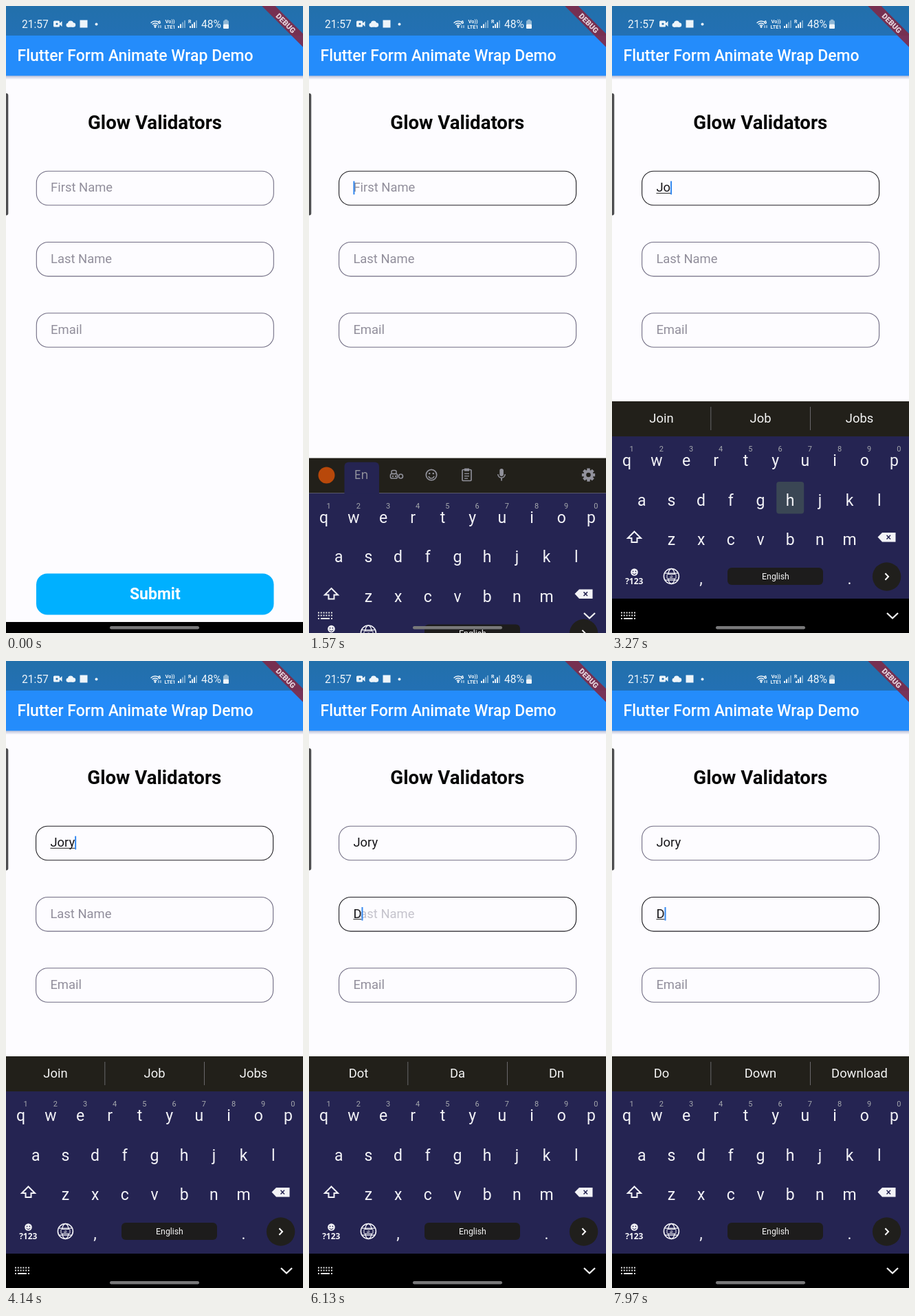
These frames come from a looping animation (432x912 px, 7990 ms). An HTML page with a canvas:

```html
<!DOCTYPE html>
<html lang="en">
<head>
<meta charset="utf-8">
<title>Form demo</title>
<style>
  html, body { margin: 0; width: 100%; height: 100%; overflow: hidden; background: #fdfcff; }
  canvas { display: block; width: 432px; height: 912px; }
</style>
</head>
<body>
<canvas id="stage"></canvas>
<script>
const W = 432, H = 912, LOOP = 7990;
const canvas = document.getElementById('stage');
const c = canvas.getContext('2d');
const dpr = window.devicePixelRatio || 1;
canvas.width = W * dpr;
canvas.height = H * dpr;

const NAVY = '#252452', OLIVE = '#22201a', PAPER = '#fdfcff', BLUE = '#248cfb', ICON = '#92929c';
const KEY_TOP = 575;
const FOCUS_FIRST = 1300, FOCUS_LAST = 4400;

const clamp = v => Math.max(0, Math.min(1, v));
const last = (list, t) => list.filter(e => e[0] <= t).pop();

// [time, text] pairs
const firstName = [[0, ''], [2600, 'J'], [3080, 'Jo'], [3340, 'Jor'], [3700, 'Jory']];
const lastName = [[0, ''], [6050, 'D']];
const suggestions = [
  [0, null], [2640, ['Join', 'Job', 'Jobs']], [FOCUS_LAST + 40, null],
  [6090, ['Dot', 'Da', 'Dn']], [7500, ['Do', 'Down', 'Download']]
];
const cursorResets = [FOCUS_FIRST, 2600, 3080, 3340, 3700, FOCUS_LAST, 6050, 7500];
// [start, end, key]
const presses = [
  [2030, 2150, 'shift'], [2480, 2600, 'j'], [2970, 3080, 'o'], [3220, 3340, 'h'],
  [3590, 3700, 'y'], [5400, 5520, 'shift'], [5940, 6050, 'd']
];
const rows = [
  { keys: 'qwertyuiop', x: 21.6, y: 669 },
  { keys: 'asdfghjkl', x: 43.2, y: 726.5 },
  { keys: 'zxcvbnm', x: 86.4, y: 784 }
];

function text(s, x, y, size, color, { weight = 400, align = 'left', family = 'Roboto' } = {}) {
  c.font = `${weight} ${size}px ${family}, sans-serif`;
  c.textAlign = align;
  c.fillStyle = color;
  c.fillText(s, x, y);
}
function rect(x, y, w, h, color) {
  c.fillStyle = color;
  c.fillRect(x, y, w, h);
}
function round(x, y, w, h, r, fill, stroke, lw = 1) {
  c.beginPath();
  c.roundRect(x, y, w, h, r);
  if (fill) { c.fillStyle = fill; c.fill(); }
  if (stroke) { c.strokeStyle = stroke; c.lineWidth = lw; c.stroke(); }
}
function disc(x, y, r, color) {
  c.beginPath();
  c.arc(x, y, r, 0, 7);
  c.fillStyle = color;
  c.fill();
}
function ring(x, y, r, color, lw, a = 0, b = Math.PI * 2) {
  c.beginPath();
  c.arc(x, y, r, a, b);
  c.strokeStyle = color;
  c.lineWidth = lw;
  c.stroke();
}
function poly(points, { fill, stroke, lw = 1, close = false }) {
  c.beginPath();
  points.forEach(([x, y], i) => i ? c.lineTo(x, y) : c.moveTo(x, y));
  if (close || fill) c.closePath();
  if (fill) { c.fillStyle = fill; c.fill(); }
  if (stroke) { c.strokeStyle = stroke; c.lineWidth = lw; c.stroke(); }
}

function bars(x, lit) {
  for (let i = 0; i < 4; i++) {
    const h = 3 + i * 2.7;
    rect(x + i * 3, 32 - h, 2, h, i < lit ? '#e8f1f8' : '#78a9d0');
  }
}

function statusBar() {
  const g = c.createLinearGradient(0, 0, 0, 43);
  g.addColorStop(0, '#2270ab');
  g.addColorStop(1, '#2370b4');
  rect(0, 0, W, 43, g);
  const ink = '#eef5fa';
  text('21:57', 23, 32, 15.6, ink);
  round(69, 21.5, 9, 9, 1.5, ink);
  poly([[77, 26], [81.5, 22], [81.5, 30]], { fill: ink });
  disc(74, 26, 1.6, '#2370b0');
  disc(90.5, 27.7, 3, ink);
  disc(94, 25.5, 4, ink);
  disc(98, 27.5, 3.2, ink);
  rect(90, 27, 8, 3.7, ink);
  round(107.5, 20.5, 11, 11, 0, ink);
  disc(131.5, 26.5, 2, ink);

  for (const r of [3, 6, 9]) ring(217, 31, r, ink, 1.4, -2.36, -0.78);
  disc(217, 30.5, 1.4, ink);
  text('6', 221, 26, 7.5, ink, { weight: 700 });
  poly([[222, 28], [222, 32]], { stroke: ink });
  poly([[225, 28], [225, 32]], { stroke: ink });
  text('Vo))', 231.5, 25, 7.5, ink, { weight: 700 });
  text('LTE1', 230.5, 33, 7.3, ink, { weight: 700 });
  bars(250, 2);
  text('R', 265, 25, 7, ink, { weight: 700 });
  bars(267, 3);
  text('48%', 284, 32, 15.6, ink);
  round(316, 21, 8, 12, 1.5, '#8eb7d6');
  rect(318, 19.7, 4, 1.5, '#8eb7d6');
  round(316, 26.5, 8, 6.5, 1.5, ink);
}

function appBar() {
  const g = c.createLinearGradient(0, 101, 0, 107);
  g.addColorStop(0, '#bcbfd2');
  g.addColorStop(0.6, '#dfe0ee');
  g.addColorStop(1, PAPER);
  rect(0, 101, W, 6, g);
  rect(0, 43, W, 58.5, BLUE);
  text('Flutter Form Animate Wrap Demo', 16.5, 80, 23, '#fff', { weight: 500 });
}

function ribbon() {
  c.save();
  c.translate(W, 0);
  c.rotate(Math.PI / 4);
  rect(-60, 28.5, 120, 13.8, 'rgba(128, 42, 72, 0.9)');
  text('DEBUG', 0, 39.3, 11, '#e6d3dc', { weight: 900, align: 'center' });
  c.restore();
}

function cursorAlpha(t) {
  const start = cursorResets.filter(e => e <= t).pop();
  if (start === undefined) return 0;
  return (t - start) % 1000 < 500 ? 1 : 0;
}

function field(y, hint, value, focused, t, hintAlpha) {
  const x = 43.8, base = y + 30;
  round(x, y, 345, 49.6, 17, null, focused ? '#201f24' : '#716d84', 1.1);
  if (hintAlpha > 0) {
    c.globalAlpha = hintAlpha;
    text(hint, 64.6, base, 18.4, '#918e9b');
    c.globalAlpha = 1;
  }
  text(value, 64.6, base, 18.4, '#17161a');
  const w = c.measureText(value).width;
  if (!focused) return;
  if (value) rect(64.6, base + 1.6, w, 1.1, '#333');
  if (cursorAlpha(t)) rect(64.6 + w, y + 14.5, 2, 19.5, '#3388f0');
}

function form(t) {
  const onFirst = t >= FOCUS_FIRST && t < FOCUS_LAST;
  const fade = at => 1 - clamp((t - at) / 167);
  c.save();
  c.translate(t < FOCUS_FIRST ? 0.5 : -0.2, 0);
  text('Glow Validators', 216, 179, 27.6, '#050505', { weight: 700, align: 'center' });
  field(240.2, 'First Name', last(firstName, t)[1], onFirst, t, fade(2600));
  field(343.5, 'Last Name', last(lastName, t)[1], t >= FOCUS_LAST, t, fade(6050));
  field(446.7, 'Email', '', false, t, 1);
  round(43.5, 825.5, 345.5, 60, 16, '#00b0ff');
  text('Submit', 216.3, 863, 23, '#fff', { weight: 700, align: 'center' });
  c.restore();
  round(-4, 127, 7.3, 177.5, 3, '#4e4e50');
}

function toolbar() {
  disc(25.5, 600, 12, '#b8480a');
  round(51.5, 581, 50.5, 46, [6, 6, 0, 0], NAVY);
  text('En', 76, 605.5, 17.5, ICON, { align: 'center', family: '"Noto Sans"' });

  round(118.5, 598, 10, 6.5, 2, null, ICON, 1.6);
  round(120, 593, 7, 5, 2, null, ICON, 1.5);
  rect(121, 600.5, 2, 2, ICON);
  rect(125, 600.5, 2, 2, ICON);
  ring(133.5, 601.5, 3, ICON, 1.6);

  ring(178, 599.5, 7.7, ICON, 1.7);
  disc(175.2, 597.5, 1.3, ICON);
  disc(180.8, 597.5, 1.3, ICON);
  ring(178, 600.5, 4, ICON, 1.6, 0.2, 2.95);

  round(223, 592, 13, 16, 1, null, ICON, 1.6);
  rect(226, 590, 7, 4, ICON);
  for (const y of [597, 600.5, 604]) rect(226, y, y > 603 ? 5 : 7, 1.3, ICON);

  round(277.3, 590.5, 5.6, 11, 2.8, ICON);
  ring(280, 598.5, 5.2, ICON, 1.5, 0, Math.PI);
  rect(279.2, 603.5, 1.7, 4.5, ICON);

  for (let i = 0; i < 8; i++) {
    c.save();
    c.translate(406.5, 599.5);
    c.rotate(i * Math.PI / 4);
    rect(-2.2, -9.6, 4.4, 4.6, ICON);
    c.restore();
  }
  ring(406.5, 599.5, 5.3, ICON, 4);
}

function suggestionStrip(words) {
  words.forEach((w, i) => text(w, 72 + 144 * i, 606, 18.4, '#f4f4f4', { align: 'center' }));
  rect(143.3, 583, 1, 34, '#69686a');
  rect(288, 583, 1, 34, '#69686a');
}

function keys(t) {
  const press = presses.find(p => t >= p[0] && t < p[1]);
  const held = press && press[2];
  const light = '#f3f3f7';
  if (held === 'shift') round(2, 750, 61, 46, 4, '#3a4654');
  rows.forEach(({ keys, x, y }, row) => {
    [...keys].forEach((k, i) => {
      const cx = x + 43.2 * i;
      if (k === held) round(cx - 20, y - 34.5, 40, 46.5, 4, '#3a4654');
      text(k, cx, y, 23, light, { align: 'center' });
      if (row === 0) text((i + 1) % 10, cx + 7, 648, 11, '#a5a8ad', { align: 'center' });
    });
  });

  poly([[32.5, 764.5], [42, 774], [36.5, 774], [36.5, 780], [28.5, 780], [28.5, 774], [23, 774]],
    { stroke: light, lw: 2, close: true });
  poly([[386.5, 772.5], [393, 766], [412.5, 766], [412.5, 779.5], [393, 779.5]], { fill: light });
  poly([[399.5, 769.8], [405, 775.5]], { stroke: NAVY, lw: 1.5 });
  poly([[405, 769.8], [399.5, 775.5]], { stroke: NAVY, lw: 1.5 });

  disc(32.5, 823.5, 5.3, light);
  disc(30.6, 822.3, 0.9, NAVY);
  disc(34.4, 822.3, 0.9, NAVY);
  ring(32.5, 824, 2.7, NAVY, 1, 0.3, 2.85);
  text('?123', 32.3, 841, 12, light, { weight: 600, align: 'center', family: '"Noto Sans"' });

  ring(86.4, 829.5, 11, light, 1.6);
  c.beginPath();
  c.ellipse(86.4, 829.5, 5, 11, 0, 0, 7);
  c.lineWidth = 1.3;
  c.stroke();
  for (const y of [824.5, 834.5]) rect(77, y, 19, 1.2, light);
  round(80, 826.5, 13, 6.5, 1, NAVY, light, 1);
  text('⌀', 86.4, 832.4, 7, light, { align: 'center', family: '"DejaVu Sans"' });

  text(',', 129.6, 841, 23, light, { align: 'center' });
  round(168, 817, 139, 25, 6, '#1d1c1c');
  text('English', 238, 834, 12.3, '#f8f8f8', { align: 'center' });
  text('.', 345.6, 841, 23, light, { align: 'center' });
  disc(399.6, 830, 20.7, '#201f1c');
  poly([[397.4, 825.3], [402, 830], [397.4, 834.7]], { stroke: '#fff', lw: 2 });
}

function keyboard(t) {
  const p = clamp((t - 1440) / 350);
  if (!p) return;
  const ease = 1 - (1 - p) ** 3;
  c.save();
  c.translate(0, (H - KEY_TOP) * (1 - ease));
  rect(0, KEY_TOP, W, 51, OLIVE);
  rect(0, 626, W, 236, NAVY);
  rect(0, 862, W, 50, '#000');
  const words = last(suggestions, t)[1];
  if (words) suggestionStrip(words); else toolbar();
  keys(t);
  c.restore();

  for (let row = 0; row < 3; row++)
    for (let i = 0; i < 6; i++) {
      if (row < 2) rect(13 + i * 3.8, 881.5 + row * 4, 2, 2, '#e4e4e4');
    }
  rect(13, 890, 2, 2, '#e4e4e4');
  rect(17, 890, 13, 2, '#e4e4e4');
  rect(32, 890, 2, 2, '#e4e4e4');
  poly([[400, 883], [408, 890.5], [416, 883]], { stroke: '#f4f4f4', lw: 2.3 });
}

function draw(t) {
  c.setTransform(dpr, 0, 0, dpr, 0, 0);
  c.textBaseline = 'alphabetic';
  rect(0, 0, W, H, PAPER);
  form(t);
  statusBar();
  appBar();
  ribbon();
  rect(0, 896, W, 16, '#000');
  keyboard(t);
  round(151, 902, 130, 4.5, 2.2, '#79797a');
}

const began = performance.now();
function tick() {
  draw((performance.now() - began) % LOOP);
  requestAnimationFrame(tick);
}
tick();
</script>
</body>
</html>
```
